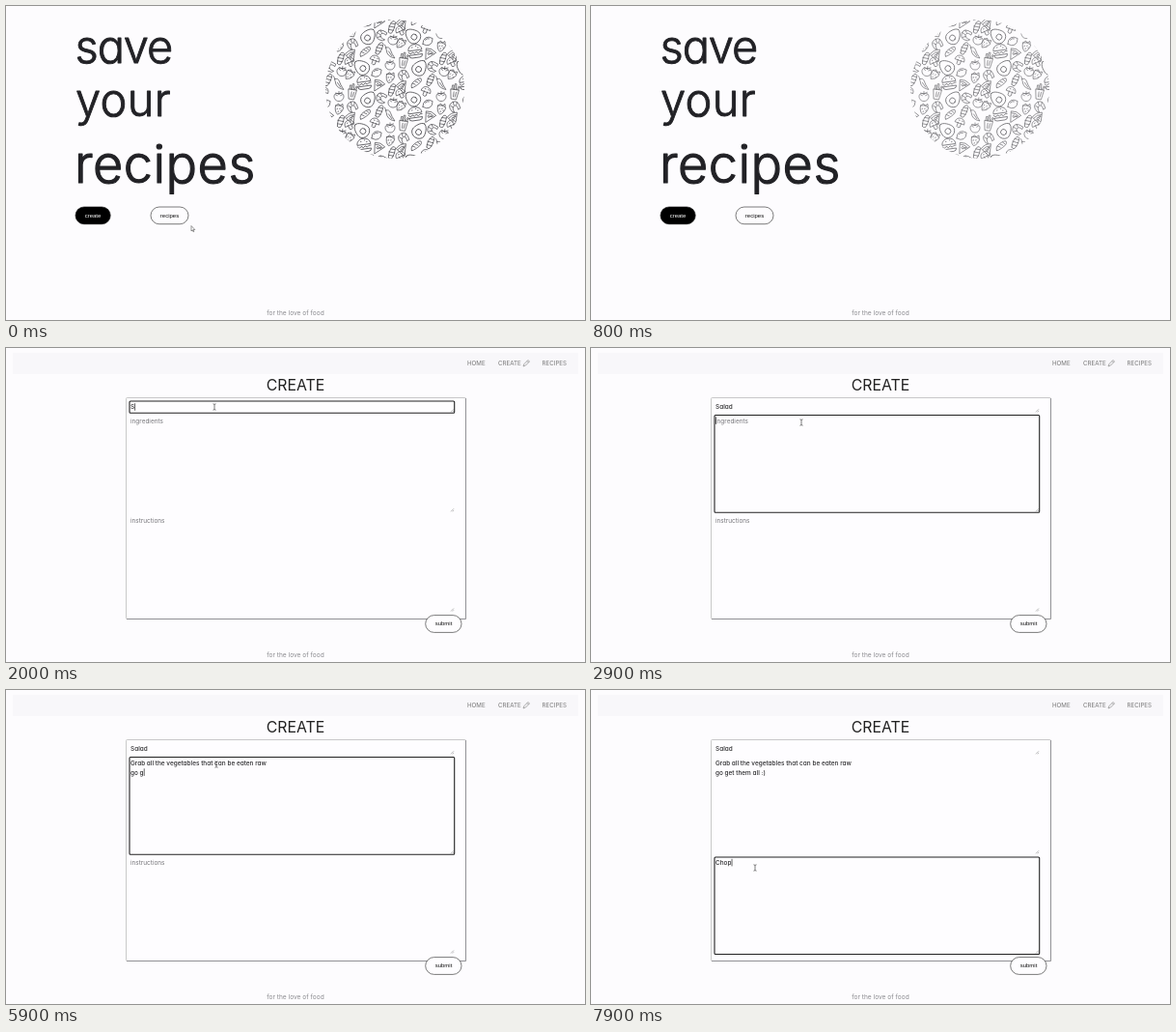
An HTML page that plays this animation: 600x325 px, repeating every 8000 ms.

```html
<!DOCTYPE html>
<html lang="en">
<head>
<meta charset="utf-8">
<title>save your recipes</title>
<style>
  html, body { margin: 0; width: 100%; height: 100%; overflow: hidden; background: #fdfcfe; }
  svg { display: block; width: 100%; height: 100%; }
  text { font: 500 6.45px Inter, Lato, sans-serif; font-feature-settings: "cv11"; fill: #333; white-space: pre; }
  .hero { font-size: 47px; font-weight: 300; letter-spacing: .3px; fill: #222226; stroke: #222226; stroke-width: .9; stroke-linejoin: round; }
  .hero.tight { letter-spacing: -1.1px; }
  .hero.big { font-size: 54px; letter-spacing: .5px; stroke-width: 1.2; }
  .nav text { font-size: 6.2px; font-weight: 400; fill: #777; }
  .nav .heading { font-size: 15.8px; fill: #222; text-anchor: middle; }
  .footer { font-size: 6.6px; font-weight: 400; fill: #8b8b8f; text-anchor: middle; }
  .button { font: 6px "Liberation Sans", Arial, sans-serif; text-anchor: middle; fill: #111; }
  .line { fill: none; stroke: #444; stroke-width: .7; }
  .doodle { fill: none; stroke: #444448; stroke-width: .75; stroke-linecap: round; stroke-linejoin: round; }
  .focus { fill: none; stroke: #222; stroke-width: 1.1; }
  .grip { stroke: #888; stroke-width: .6; }
</style>
</head>
<body>
<svg viewBox="0 0 600 325" preserveAspectRatio="none">
  <defs>
    <clipPath id="disc"><circle cx="403" cy="86" r="72"/></clipPath>
    <g id="burger"><path d="M-7-1C-7-9 7-9 7-1ZM-7 1q2 3 4 0q2 3 4 0q2 3 4 0l2 0M-7 4H7Q7 7 4 7H-4Q-7 7-7 4M-3-4h.5M1-5h.5M3-3h.5"/></g>
    <g id="avocado"><path d="M0-8C4-8 7 0 7 3A7 6 0 0 1-7 3C-7 0-4-8 0-8Z"/><circle cy="2.5" r="3"/></g>
    <g id="tomato"><path d="M0-3C8-7 8 6 0 6S-8-7 0-3M-4-4L0-3 4-5M0-3V-6M-2-1L-4-2M2-1L4-2"/></g>
    <g id="berry"><path d="M-5-3Q0-6 5-3Q5 4 0 7Q-5 4-5-3M-4-4L-2-6 0-4 3-7 4-4M-2 0v1M1-1v1M0 3v1M3 1v1"/></g>
    <g id="cup"><path d="M-5-3H5L3 9H-3ZM-4-3V-8H-2V-3M-1-3V-10H1V-3M2-3L4-8 5-7 4-3M-1 0V6M2 0L1 6"/></g>
    <g id="mushroom"><path d="M-6 0C-6-8 6-8 6 0ZM-2 0V5Q0 7 2 5V0M-2-3h1M2-3h1"/></g>
    <g id="bread"><path d="M-8 2Q-7-3 0-3T8-1Q8 3 0 3T-8 2M-4-2L-2 1M0-2L2 1M4-2L5 1"/></g>
    <g id="pizza"><path d="M-6-5Q0-8 7-4L-2 8ZM-5-3Q0-5 5-2"/><circle cx="-1" cy="0" r="1.4"/><circle cx="2" cy="-1" r=".8"/></g>
    <g id="lemon"><path d="M-7 0Q-4-5 0-5T7 0Q4 5 0 5T-7 0M-2-3Q1-4 3-2"/></g>
    <g id="sausage"><path d="M-7-2Q0-5 7-2Q9 0 7 2Q0 4-7 2Q-9 0-7-2M-4-3L-3 3M0-4L1 3M4-3L5 2"/></g>
    <g id="shrimp"><path d="M5-5Q-6-8-6 0T4 6L6 4Q-1 4-1 0T5-2ZM-3-5L-1-3M-6-1L-2 0M-3 4L0 2"/></g>
    <g id="chili"><path d="M-6-5Q-2-7 0-3T7 6Q-3 6-5-2ZM-6-5L-8-8M-2-1L3 4"/></g>
    <g id="arrow"><path d="M0 .5V6L1.2 4.8 2.1 6.8 2.9 6.4 2.1 4.5H3.8Z" fill="#fff" stroke="#555" stroke-width=".6"/></g>
    <g id="hand"><path d="M1.3 .8V4L0 3.4-.6 4.2 1.4 7.5H4.6L5.1 3.6 2.3 2.9V.8Z" fill="#fff" stroke="#444" stroke-width=".6"/></g>
    <g id="beam"><path d="M-1.5-3.2Q0-3.2 0-2.4Q0-3.2 1.5-3.2M0-2.4V2.4M-1.5 3.2Q0 3.2 0 2.4Q0 3.2 1.5 3.2" class="line"/></g>
    <path id="grip" class="grip" d="M0 3L3 0M1.8 3L3 1.8"/>
  </defs>
  <rect width="600" height="325" fill="#fdfcfe"/>

  <g id="home">
    <text class="hero tight" x="71.5" y="59">save</text>
    <text class="hero" x="72" y="114">your</text>
    <text class="hero big" x="71" y="183">recipes</text>
    <g clip-path="url(#disc)"><g id="doodles" class="doodle"></g></g>
    <rect id="createPill" x="72" y="208" width="36.2" height="17.7" rx="8.85" stroke="#111" stroke-width=".7"/>
    <rect id="createFocus" class="line" x="72" y="208" width="36.2" height="17.7"/>
    <text id="createLabel" class="button" x="90" y="218.6">create</text>
    <rect class="line" x="150" y="208" width="39" height="17.7" rx="8.85"/>
    <text class="button" x="169.5" y="218.6">recipes</text>
  </g>

  <g id="nav" class="nav">
    <rect x="7" y="5" width="586" height="22" fill="#f8f7fa"/>
    <text x="478" y="18.4">HOME</text>
    <text x="510" y="18.4">CREATE</text>
    <path d="M536 19L537 16.5 541 12.5 542.5 14 538.5 18ZM540 13.5L541.5 15" fill="none" stroke="#888" stroke-width=".7"/>
    <text x="555.5" y="18.4">RECIPES</text>
    <text id="heading" class="heading" x="300" y="43.5"></text>
  </g>

  <g id="form">
    <rect x="124.5" y="51.5" width="352" height="229" rx="1" fill="#fefdff" stroke="#bbb" stroke-width=".8"/>
    <path d="M476.5 52V280.5H125" fill="none" stroke="#8c8c90" stroke-width=".9"/>
    <g id="fields"></g>
    <rect class="line" x="434.7" y="276.6" width="37.3" height="17.8" rx="8.9" style="fill:#fefdff"/>
    <text class="button" x="453.5" y="287.4">submit</text>
  </g>

  <text class="footer" x="300" y="319.6">for the love of food</text>
  <use id="pointer"/>
</svg>
<script>
const LOOP = 8000, STEP = 100;
const $ = id => document.getElementById(id);

function add(parent, tag, attrs) {
  const node = document.createElementNS('http://www.w3.org/2000/svg', tag);
  for (const key in attrs) node.setAttribute(key, attrs[key]);
  return parent.appendChild(node);
}
const show = (node, visible) => node.setAttribute('visibility', visible ? 'inherit' : 'hidden');

// Doodles around one burger: name, dx, dy, rotation
const motif = [
  ['burger', 0, 0, -8], ['avocado', 5, 17, 35], ['avocado', -3, -16, -50], ['bread', 1, 33, -35],
  ['pizza', 15, 3, 20], ['shrimp', 18, 16, 20], ['lemon', 13, -10, -30], ['mushroom', 11, -23, 20],
  ['sausage', 16, 30, -65], ['chili', 27, -31, 10], ['tomato', 27, -18, 0], ['berry', 27, -5, 15],
  ['sausage', 29, 8, -70], ['tomato', 30, 21, 10], ['cup', -12, 10, 8], ['berry', -15, -8, 40],
  ['mushroom', -15, -21, -25], ['shrimp', -12, 25, 60], ['pizza', -13, 37, -30]
];
for (let col = -2; col <= 3; col++) {
  for (let row = -2; row <= 2; row++) {
    const cx = 371 + col * 53, cy = 79 + row * 65 - (col & 1) * 32.5;
    motif.forEach(([name, dx, dy, turn], i) => add($('doodles'), 'use', {
      href: '#' + name,
      transform: `translate(${cx + dx} ${cy + dy}) rotate(${turn}) scale(${i < 3 ? 1 : .84})`
    }));
  }
}

// keys: [time, characters typed]
const fields = [
  { hint: 'title', top: 55, height: 12.3, focus: [1700, 2800], value: 'Salad',
    keys: [[1900, 0], [2000, 1], [2400, 5]] },
  { hint: 'ingredients', top: 69.5, height: 100.8, focus: [2800, 7300],
    value: 'Grab all the vegetables that can be eaten raw\ngo get them all :)',
    keys: [[2900, 0], [4000, 23], [5300, 45], [5500, 46], [5900, 50], [7000, 64]] },
  { hint: 'instructions', top: 173, height: 100.5, focus: [7300, 8001], value: 'Chop',
    keys: [[7500, 0], [7900, 4]] }
];
for (const field of fields) {
  const group = $('fields'), base = field.top + (field.height < 20 ? 8.4 : 8);
  field.base = base;
  add(group, 'use', { href: '#grip', x: 461, y: field.top + field.height - 4 });
  field.box = add(group, 'rect', { class: 'focus', x: 128, y: field.top, width: 336.7, height: field.height, rx: 1 });
  field.lines = [0, 10].map(dy => add(group, 'text', { x: 129, y: base + dy }));
  field.caret = add(group, 'rect', { width: .7, height: 7.6, fill: '#222' });
}

function lerpKeys(keys, t, index) {
  const next = keys.findIndex(key => key[0] > t);
  if (next < 0) return keys[keys.length - 1][index];
  if (next === 0) return keys[0][index];
  const a = keys[next - 1], b = keys[next];
  return a[index] + (b[index] - a[index]) * (t - a[0]) / (b[0] - a[0]);
}

// [time, x, y, shape]
const path = [
  [0, 192, 227, 'arrow'], [200, 176, 218, 'arrow'], [300, 176, 218, 'arrow'], [600, 486, 15, 'hand'],
  [800, 486, 15, ''], [900, 300, 110, 'arrow'], [1000, 60, 212, 'arrow'], [1100, 78, 219, 'hand'],
  [1300, 78, 219, 'hand'], [1400, 90, 200, 'arrow'], [1600, 216, 61, 'beam'], [2600, 216, 61, 'beam'],
  [2800, 218, 77, 'beam'], [7100, 218, 77, 'beam'], [7300, 170, 184, 'beam'], [8000, 170, 184, 'beam']
];

function drawField(field, t) {
  const typed = field.value.slice(0, Math.floor(lerpKeys(field.keys, t, 1) + 1e-6));
  const focused = t >= field.focus[0] && t < field.focus[1];
  const rows = typed ? typed.split('\n') : [field.hint];
  field.lines.forEach((line, i) => {
    line.textContent = rows[i] || '';
    line.style.fill = typed ? '#2c2c2e' : '#77777b';
    line.style.fontWeight = typed ? 500 : 400;
  });
  show(field.box, focused);
  show(field.caret, focused);
  if (!focused) return;
  const last = rows.length - 1;
  const width = typed && rows[last] ? field.lines[last].getComputedTextLength() : 0;
  field.caret.setAttribute('x', 129.2 + width);
  field.caret.setAttribute('y', field.base - 6.2 + last * 10);
}

function draw(t) {
  const home = t < 200 || (t >= 800 && t < 1400), create = t >= 1400;
  const hover = t >= 1100 && t < 1400;
  show($('home'), home);
  show($('nav'), !home);
  show($('form'), create);
  $('heading').textContent = create ? 'CREATE' : 'RECIPES';
  $('createPill').setAttribute('fill', hover ? '#fdfcfe' : '#000');
  $('createLabel').style.fill = hover ? '#111' : '#fff';
  show($('createFocus'), home && t >= 1200);
  $('doodles').setAttribute('opacity', t >= 800 && t < 1000 ? .8 : 1);
  for (const field of fields) drawField(field, t);
  const shape = path.filter(key => key[0] <= t).pop()[3];
  show($('pointer'), shape);
  $('pointer').setAttribute('href', '#' + shape);
  $('pointer').setAttribute('transform', `translate(${lerpKeys(path, t, 1)} ${lerpKeys(path, t, 2)})`);
}

const start = performance.now();
function tick() {
  const elapsed = (performance.now() - start) % LOOP;
  draw(Math.floor(elapsed / STEP) * STEP);
  requestAnimationFrame(tick);
}
tick();
</script>
</body>
</html>
```
